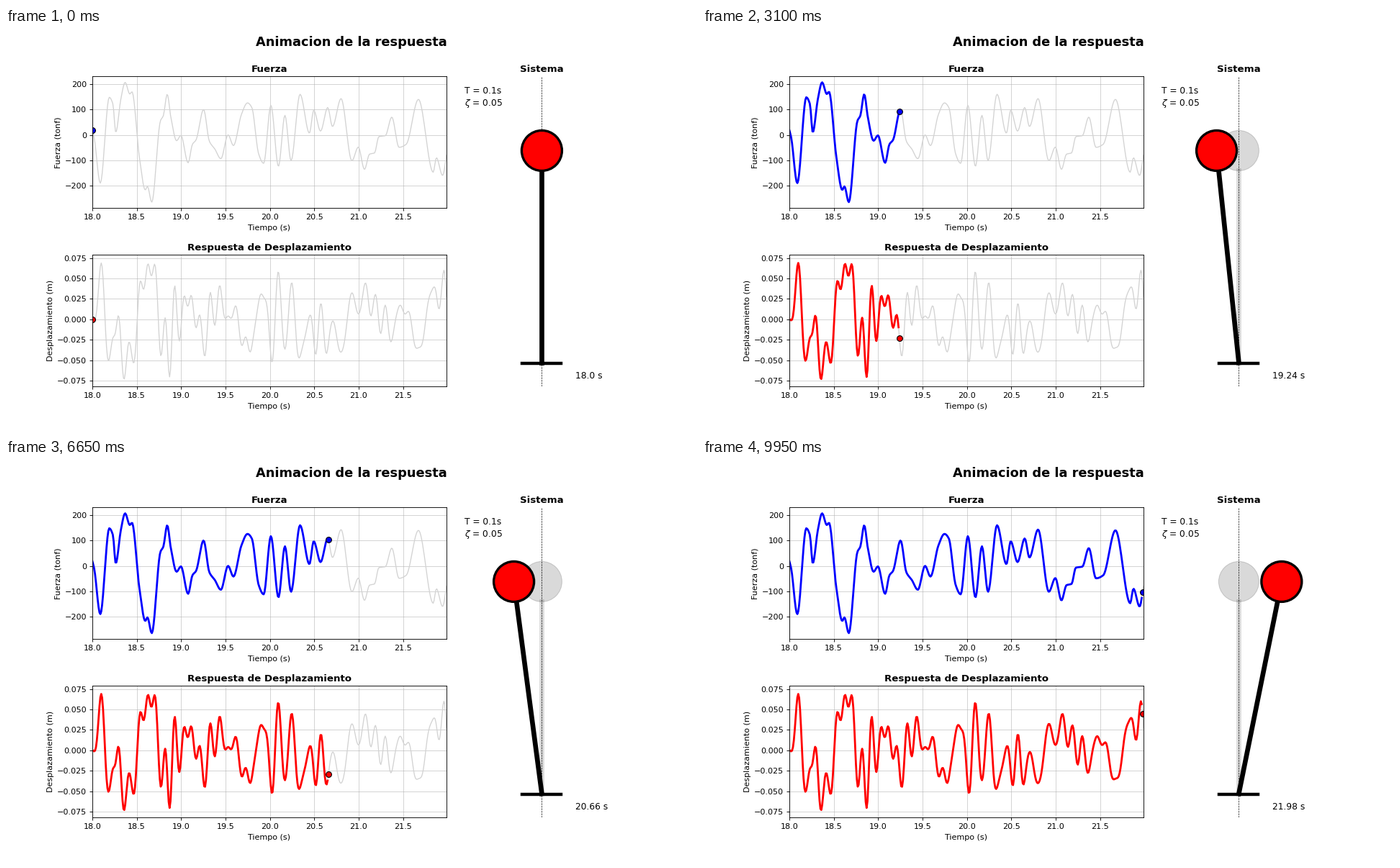
A matplotlib script that plays this animation: 960x560 px, repeating every 10000 ms.

```python
import numpy as np
import matplotlib.pyplot as plt
from matplotlib.animation import FuncAnimation
from matplotlib.patches import Circle

W, H, DPI = 960, 560, 80
LEFT, RIGHT, TOP, BOTTOM = 120, 612, 67.2, 498.4
PLOT_H = 183.1
T0, DT, SAMPLES = 18, 0.01, 400
PERIOD, DAMPING = 0.1, 0.05
FRAMES, INTERVAL = 200, 50

# Turning points and shoulders of the force: (stage x, tonf)
FORCE_KEYS = [
    (120, 18), (122.5, -10), (131, -190), (143.5, 148), (148.5, 122),
    (152.5, 10), (159.5, 140), (165.5, 207), (172, 161), (175, 170),
    (185.3, -88), (193.5, -217), (196.5, -203), (202.5, -265), (214.5, 55),
    (218.5, 75), (224, 160), (229, 70), (237, -23), (243, -2), (253, -110),
    (259, -37), (264, -20), (274.5, 100), (282.5, -25), (290, -55),
    (298.5, -94), (308.5, 0), (316, -42), (327, 80), (335.5, 126),
    (341.5, 108), (351, -75), (358, -112), (368, 117), (378.5, -124),
    (387.5, 77), (396, -102), (408.5, 160), (421.5, 7), (427.5, 97),
    (437, 15), (447, 108), (453.5, 33), (465.5, 143), (480.5, -102),
    (489.5, -48), (498, -136), (505, -76), (512, -71), (518, -7), (527, -3),
    (536, 70), (546, -49), (556, -37), (573, 140), (593.5, -147), (598, -90),
    (606.5, -160), (612.5, -72)]


def smooth(keys, x):
    """Monotone cubic through the keys, flat at every turning point."""
    xs, ys = np.array(keys, float).T
    h = np.diff(xs)
    s = np.diff(ys) / h
    a, b = s[:-1], s[1:]
    same = a * b > 0
    m = np.zeros(len(xs))
    m[0], m[-1] = s[0], s[-1]
    m[1:-1][same] = 2 * a[same] * b[same] / (a[same] + b[same])
    i = np.clip(np.searchsorted(xs, x, side="right") - 1, 0, len(h) - 1)
    u = (x - xs[i]) / h[i]
    return (ys[i] * (1 + 2 * u) * (1 - u) ** 2 + ys[i + 1] * u * u * (3 - 2 * u)
            + h[i] * (m[i] * u * (1 - u) ** 2 - m[i + 1] * u * u * (1 - u)))


def response(load):
    """Damped unit-mass oscillator from rest, by Newmark's average acceleration."""
    w = 2 * np.pi / PERIOD
    c, q = 2 * DAMPING * w, DT * DT / 4
    u, v, a = 0.0, 0.0, -load[0]
    out = [u]
    for p in load[1:]:
        u += DT * v + q * a
        v += DT / 2 * a
        a = (-p - c * v - w * w * u) / (1 + c * DT / 2 + w * w * q)
        u += q * a
        v += DT / 2 * a
        out.append(u)
    return np.array(out)


time = T0 + DT * np.arange(SAMPLES)
force = smooth(FORCE_KEYS, np.linspace(LEFT, RIGHT, SAMPLES))
disp = response(force)

plt.rcParams["font.family"] = "DejaVu Sans"
fig = plt.figure(figsize=(W / DPI, H / DPI), dpi=DPI, facecolor="white")
fig.suptitle("Animacion de la respuesta", fontsize=16, fontweight="bold")


def stage_axes(x0, x1, top, bottom, title):
    ax = fig.add_axes([x0 / W, 1 - bottom / H, (x1 - x0) / W, (bottom - top) / H])
    ax.set_title(title, fontsize=12, fontweight="bold")
    return ax


def plot_axes(top, title, ylabel, ylim, values, color):
    ax = stage_axes(LEFT, RIGHT, top, top + PLOT_H, title)
    ax.set_xlim(time[0], time[-1])
    ax.set_ylim(*ylim)
    ax.set_xticks(np.arange(18, 21.6, 0.5))
    ax.set_xlabel("Tiempo (s)")
    ax.set_ylabel(ylabel)
    ax.grid(color="#b0b0b0", alpha=0.6)
    ax.plot(time, values, color="lightgray", lw=1.2)
    line, = ax.plot([], [], color=color, lw=2.5)
    dot, = ax.plot([], [], "o", color=color, ms=7, mec="black", mew=1)
    return line, dot, values


plots = [
    plot_axes(TOP, "Fuerza", "Fuerza (tonf)",
              (-288.6, 230.6), force, "blue"),
    plot_axes(BOTTOM - PLOT_H, "Respuesta de Desplazamiento",
              "Desplazamiento (m)", (-0.0825, 0.0788), disp, "red"),
]

# The system panel uses stage pixels as its data units
CX, BALL_Y, BASE_Y, R = 744.4, 170.4, 466, 28
SWAY = 1327  # pixels per metre
panel = stage_axes(624, 864, TOP, BOTTOM, "Sistema")
panel.set_xlim(624, 864)
panel.set_ylim(BOTTOM, TOP)
panel.axis("off")


def rod_ends(x):
    """Rod from the base to the rim of a ball centred at x."""
    dx, dy = x - CX, BALL_Y - BASE_Y
    k = 1 - R / np.hypot(dx, dy)
    return [CX, CX + k * dx], [BASE_Y - 1, BASE_Y + k * dy]


panel.plot(*rod_ends(CX), color="black", alpha=0.15, lw=6, zorder=1)
panel.add_patch(Circle((CX, BALL_Y), R, fc="black", ec="black", lw=1,
                       alpha=0.15, zorder=1.1))
panel.axvline(CX, ls="--", color="black", lw=0.6, zorder=2)
panel.plot([CX - 27, CX + 27], [BASE_Y, BASE_Y], color="black", lw=4, zorder=3)
rod, = panel.plot([], [], color="black", lw=6, zorder=4)
ball = panel.add_patch(Circle((CX, BALL_Y), R, fc="red", ec="black", lw=3, zorder=5))
panel.text(637, 91.5, "T = 0.1s", fontsize=11)
panel.text(637, 108.5, r"$\zeta$ = 0.05", fontsize=11)
clock = panel.text(791, 487.2, "", fontsize=11)


def update(frame):
    k = 2 * frame
    for line, dot, values in plots:
        line.set_data(time[:k], values[:k])
        dot.set_data([time[k]], [values[k]])
    x = CX + SWAY * disp[k]
    rod.set_data(*rod_ends(x))
    ball.center = (x, BALL_Y)
    clock.set_text(f"{round(float(time[k]), 2)} s")


anim = FuncAnimation(fig, update, frames=FRAMES, interval=INTERVAL,
                     init_func=lambda: update(0), repeat=True, repeat_delay=0)
plt.show()
```
